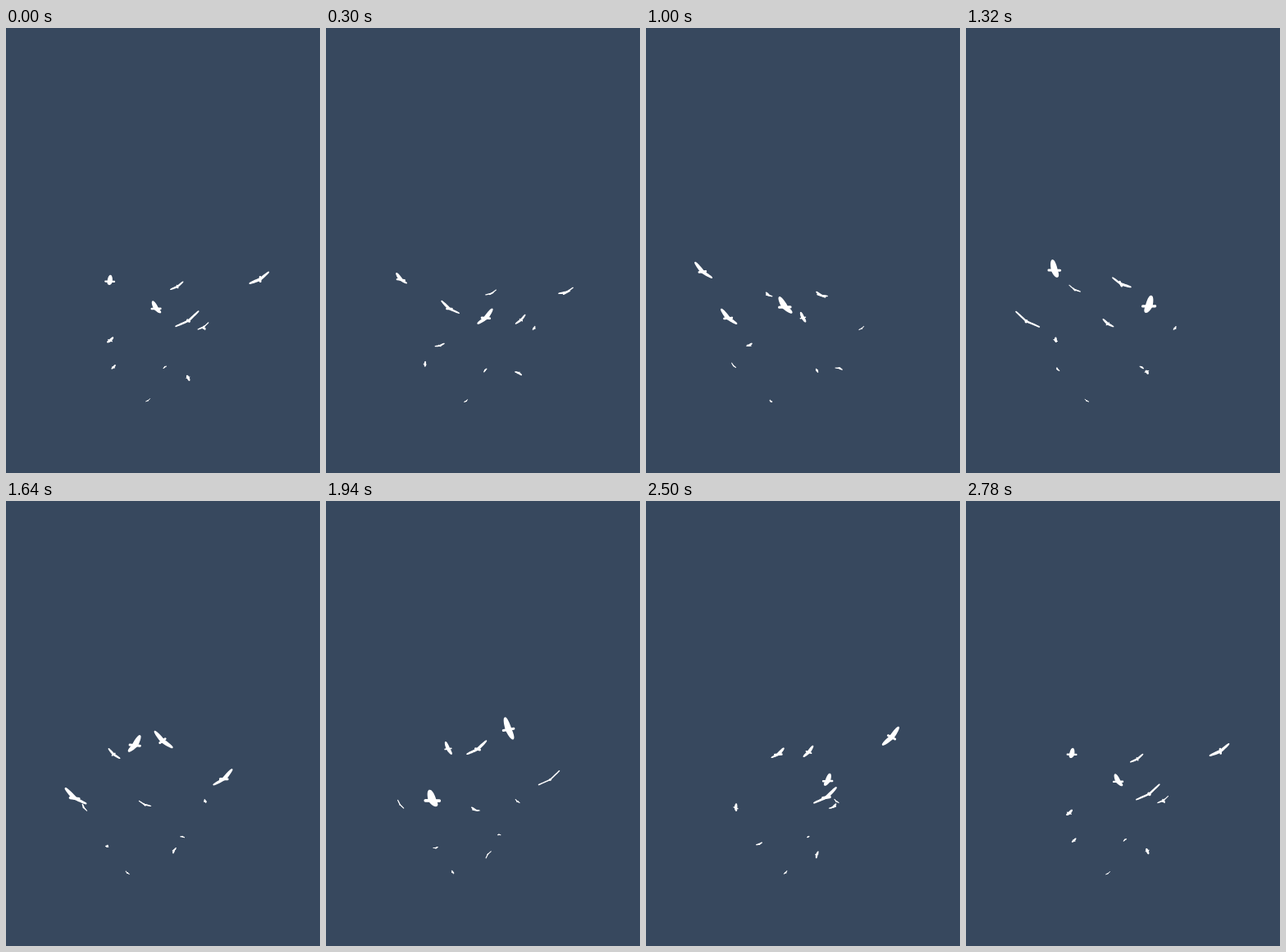
Recreate the animation shown at these times as an HTML page with a canvas. Size 383 by 542 pixels, loop 2800 ms.

```html
<!DOCTYPE html>
<html lang="en">
<head>
<meta charset="utf-8">
<title>Circling birds</title>
<style>
html, body { margin: 0; height: 100%; overflow: hidden; background: #37485e; }
canvas { display: block; }
</style>
</head>
<body>
<canvas width="383" height="542"></canvas>
<script>
const ctx = document.querySelector('canvas').getContext('2d');
const LOOP = 2800, STEP = 20, DEG = Math.PI / 180;
const SPAN = 0.235;      // wing length relative to the orbit radius
const DEPTH = 0.0022;    // growth per pixel towards the viewer
const BANK = 33, DIHEDRAL = 10, CHORD = 0.2, BODY = 0.42;

// Orbit of each bird: centre x, y, radius, start angle, pitch, roll (degrees).
// A pitch beyond 90 turns the orbit upside down.
const orbits = [
  [124, 303, 63, 87, 6, 2],
  [169, 315.5, 40, -8, 20, 2],
  [248, 306.5, 62, -1, 26],
  [206, 340.5, 68, 113, 1, -1],
  [149, 357.5, 76, 8, -5],
  [205, 363.3, 37, -17, -21, -5],
  [247, 366, 17.5, -107, 0],
  [115.5, 379.7, 27, -67, 7, 21],
  [123, 415.3, 17.3, 65, -17, 18],
  [204.4, 412.5, 11.6, 156, 210, -15],
  [219.3, 423, 23.7, -86, 189, -21],
  [160, 453.7, 13.4, -3, 6]
];

function drawBird([x, y, radius, start, pitch, roll = 0], turn) {
  const angle = start * DEG + turn;
  const c = Math.cos(angle), s = Math.sin(angle);
  const tilt = Math.sin(pitch * DEG), level = Math.cos(pitch * DEG);
  const near = 1 - DEPTH * radius * s * level;
  const size = SPAN * radius * near;

  // Screen place of a point given outwards, ahead and above in the orbit
  const project = (out, ahead, up) =>
    [out * c - ahead * s, (out * s + ahead * c) * tilt - up * level];
  const trace = points => {
    ctx.beginPath();
    for (const p of points) ctx.lineTo(...project(...p).map(n => n * size));
  };

  ctx.save();
  ctx.translate(x, y);
  ctx.rotate(roll * DEG);
  ctx.translate(...project(radius * near, 0, 0));

  ctx.lineWidth = Math.max(1, size * 0.09);
  for (const side of [1, -1]) {
    const lift = (BANK + side * DIHEDRAL) * DEG;
    const outline = [];
    for (let a = -90; a <= 90; a += 10) {
      const reach = side * 0.97 * Math.cos(a * DEG);
      outline.push([reach * Math.cos(lift), CHORD * Math.sin(a * DEG), reach * Math.sin(lift)]);
    }
    trace(outline);
    ctx.closePath();
    ctx.fill();
    ctx.stroke();
  }

  trace([[0, -BODY, 0], [0, BODY, 0]]);
  ctx.lineWidth = Math.max(1, size * 0.18);
  ctx.stroke();
  ctx.restore();
}

function frame() {
  const time = Math.floor(performance.now() % LOOP / STEP) * STEP;
  ctx.fillStyle = '#37485e';
  ctx.fillRect(0, 0, 383, 542);
  ctx.fillStyle = ctx.strokeStyle = '#fff';
  ctx.lineJoin = ctx.lineCap = 'round';
  for (const orbit of orbits) drawBird(orbit, time / LOOP * 2 * Math.PI);
  requestAnimationFrame(frame);
}
frame();
</script>
</body>
</html>
```
